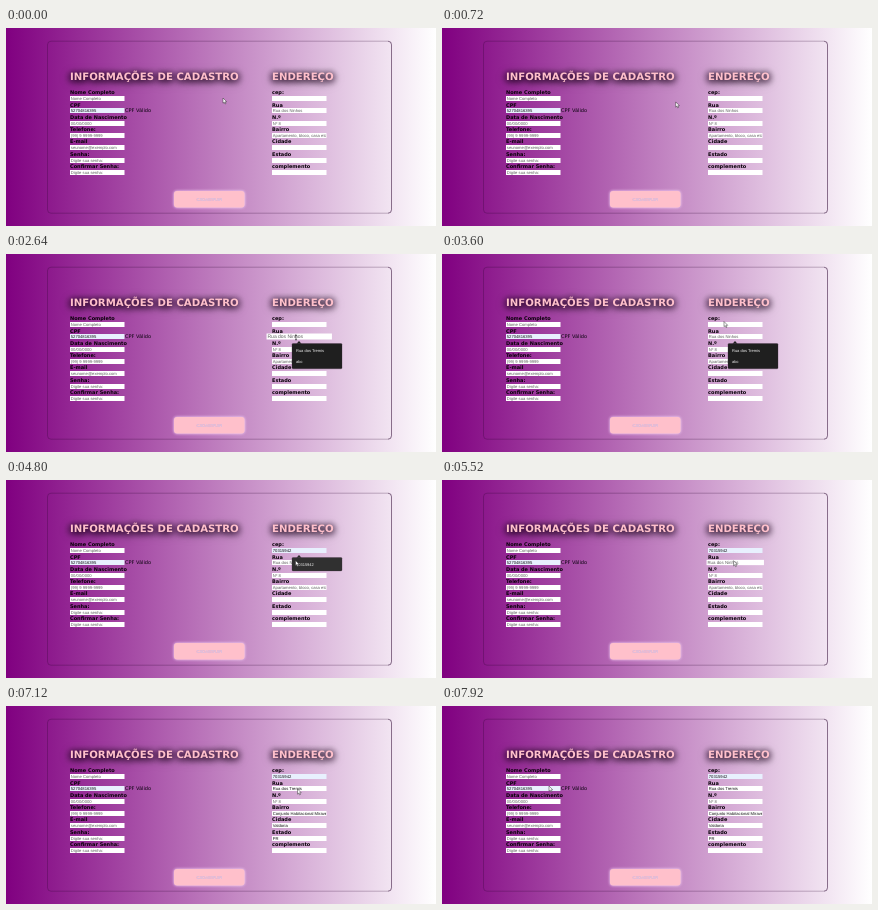
Recreate the animation shown at these times as an HTML page. Size 430 px wide and 198 px high, loop 8000 ms.

```html
<!DOCTYPE html>
<html lang="pt-BR">
<head>
<meta charset="utf-8">
<title>Cadastro</title>
<style>
html, body { margin: 0; width: 100%; height: 100%; overflow: hidden; }
svg { display: block; text-rendering: geometricPrecision; }
#stage { width: 430px; height: 198px; background: linear-gradient(to right, #800080, #fff); }
.frame { fill: none; stroke: #2a0530; stroke-width: .6; }
.title { font: bold 10.16px "DejaVu Sans", sans-serif; fill: #ffc0cb; text-shadow: 0 1px 6px rgba(30, 0, 30, .75), 0 1px 8px rgba(30, 0, 30, .4); filter: drop-shadow(0 1px 3px rgba(30, 0, 30, .75)); }
.label { font: bold 5px "DejaVu Sans", sans-serif; fill: #080008; }
.note { font: 5px "DejaVu Sans", sans-serif; fill: #0c0410; }
.value, .tip { font: 4.17px "Liberation Sans", Arial, sans-serif; }
.tip { fill: #f2f2f2; font-size: 4px; }
.button { fill: #ffc0cb; filter: drop-shadow(0 0 1.5px #ffdfff); }
.caption { font: 4.2px "Liberation Sans", Arial, sans-serif; fill: #fff; filter: drop-shadow(.4px .4px .3px #8a4aa8); }
</style>
</head>
<body>
<svg id="stage" viewBox="0 0 430 198">
  <rect class="frame" x="41.5" y="13.2" width="344" height="172" rx="3.5" opacity=".45"/>
  <path class="frame" d="M382 13.2Q385.5 13.2 385.5 16.7V181.7Q385.5 185.2 382 185.2" opacity=".6"/>
  <text class="title" x="64" y="52">INFORMAÇÕES DE CADASTRO</text>
  <text class="title" x="266" y="52">ENDEREÇO</text>
  <g id="form"></g>
  <text class="note" x="119" y="84.4">CPF Válido</text>
  <rect class="button" x="168" y="163" width="70.5" height="16.5" rx="3"/>
  <text class="caption" x="203.3" y="172.5" text-anchor="middle">CADASTRAR</text>
  <g id="streetTip">
    <path d="M290.5 89.8L293 87L295.5 89.8Z" fill="#1f1f1f"/>
    <rect x="286" y="89.5" width="50" height="25.3" rx="1" fill="#1f1f1f" stroke="#3d2a3d" stroke-width=".3"/>
    <text class="tip" x="290" y="98">Rua dos Tremis</text>
    <text class="tip" x="290" y="109">abc</text>
  </g>
  <g id="cepTip">
    <path d="M290.5 77.8L293 75L295.5 77.8Z" fill="#2b2b2b"/>
    <rect x="286" y="77.5" width="50" height="13.4" rx="1" fill="#303030" stroke="#3d2a3d" stroke-width=".3"/>
    <text class="tip" x="290" y="85.8">70315942</text>
  </g>
  <g id="mouse">
    <path id="arrow" d="M0 0V5.2L1.2 4.1L2 6L2.9 5.6L2.1 3.8H3.7Z" fill="#fff" stroke="#222" stroke-width=".45"/>
    <path id="beam" d="M-1 -2.3H1M0 -2.3V2.3M-1 2.3H1" fill="none" stroke="#111" stroke-width=".6"/>
  </g>
</svg>
<script>
const LOOP = 8000, PITCH = 12.3, WIDTH = 54.5;
const GREY = '#5f5f5f', BLUE = '#e8f0fe';
const $ = id => document.getElementById(id);

function add(parent, tag, attrs, text = '') {
  const el = document.createElementNS('http://www.w3.org/2000/svg', tag);
  for (const k in attrs) el.setAttribute(k, attrs[k]);
  el.textContent = text;
  parent.append(el);
  return el;
}

// Each row: label, placeholder, typed value, time the value appears
const person = [
  ['Nome Completo', 'Nome Completo'],
  ['CPF', '', '52704816395', 0],
  ['Data de Nascimento', '00/00/0000'],
  ['Telefone:', '(99) 9 9999-9999'],
  ['E-mail', 'seunome@exemplo.com'],
  ['Senha:', 'Digite sua senha:'],
  ['Confirmar Senha:', 'Digite sua senha:']
];
const address = [
  ['cep:', '', '70315942', 4640],
  ['Rua', 'Rua dos Ninhos', 'Rua dos Tremis', 6880],
  ['N.º', 'Nº 8'],
  ['Bairro', 'Apartamento, bloco, casa etc.', 'Conjunto Habitacional Miravel', 6880],
  ['Cidade', '', 'Valdoria', 6880],
  ['Estado', '', 'PR', 6880],
  ['complemento', '']
];

function buildField(x, [label, hint, value, at = Infinity], i) {
  const y = Math.round(68 + i * PITCH);
  add($('form'), 'text', { class: 'label', x, y: 66.2 + i * PITCH }, label);
  const group = add($('form'), 'g', {});
  const box = add(group, 'rect', { x, y, width: WIDTH, height: 5 });
  const clip = add(group, 'svg', { x, y: y - 1, width: WIDTH - .6, height: 7 });
  const text = add(clip, 'text', { class: 'value', x: .8, y: 5 });
  const auto = label === 'CPF' || label === 'cep:';
  return {
    draw(t) {
      const done = t >= at;
      text.textContent = done ? value : hint;
      text.setAttribute('fill', done ? '#111' : GREY);
      box.setAttribute('fill', done && auto ? BLUE : '#fff');
    },
    scale(s) {
      const cx = x + WIDTH / 2, cy = y + 2.5;
      group.setAttribute('transform', `translate(${cx} ${cy}) scale(${s}) translate(${-cx} ${-cy})`);
    }
  };
}

const left = person.map((row, i) => buildField(64, row, i));
const right = address.map((row, i) => buildField(266, row, i));
const fields = [...left, ...right];

// Hovered fields grow: [field, enter, leave]
const hovers = [
  [right[1], 1460, 3300],
  [right[0], 3610, 4450],
  [right[1], 5440, 5700]
];

// Pointer path: time, x, y
const path = [
  [0, 217, 70], [400, 217, 70], [1360, 281, 85], [1520, 281, 85],
  [1900, 290, 83.5], [3120, 290, 83.5], [3520, 282, 67.5], [4240, 282, 67.5],
  [4720, 289.5, 80.5], [5440, 289.5, 80.5], [6000, 326, 83.5],
  [6880, 326, 83.5], [7840, 107, 80], [8000, 107, 80]
];

const smooth = p => p * p * (3 - 2 * p);
const ramp = (t, from, span) => smooth(Math.min(1, Math.max(0, (t - from) / span)));
const show = (id, on) => $(id).setAttribute('visibility', on ? 'visible' : 'hidden');

function pointer(t) {
  const i = path.findIndex(p => p[0] > t);
  const [t0, x0, y0] = path[i - 1], [t1, x1, y1] = path[i];
  const p = ramp(t, t0, t1 - t0);
  return [x0 + (x1 - x0) * p, y0 + (y1 - y0) * p];
}

function draw(t) {
  fields.forEach(f => f.draw(t));
  const grow = new Map();
  for (const [field, enter, leave] of hovers) {
    const amount = ramp(t, enter, 240) - ramp(t, leave, 240);
    grow.set(field, (grow.get(field) || 0) + amount);
  }
  grow.forEach((amount, field) => field.scale(1 + .2 * amount));
  show('streetTip', t >= 2080 && t < 4080);
  show('cepTip', t >= 4080 && t < 5440);
  const beam = t >= 1340 && t < 3240;
  show('beam', beam);
  show('arrow', !beam);
  $('mouse').setAttribute('transform', `translate(${pointer(t)})`);
}

function tick() {
  draw(performance.now() % LOOP);
  requestAnimationFrame(tick);
}
tick();
</script>
</body>
</html>
```
